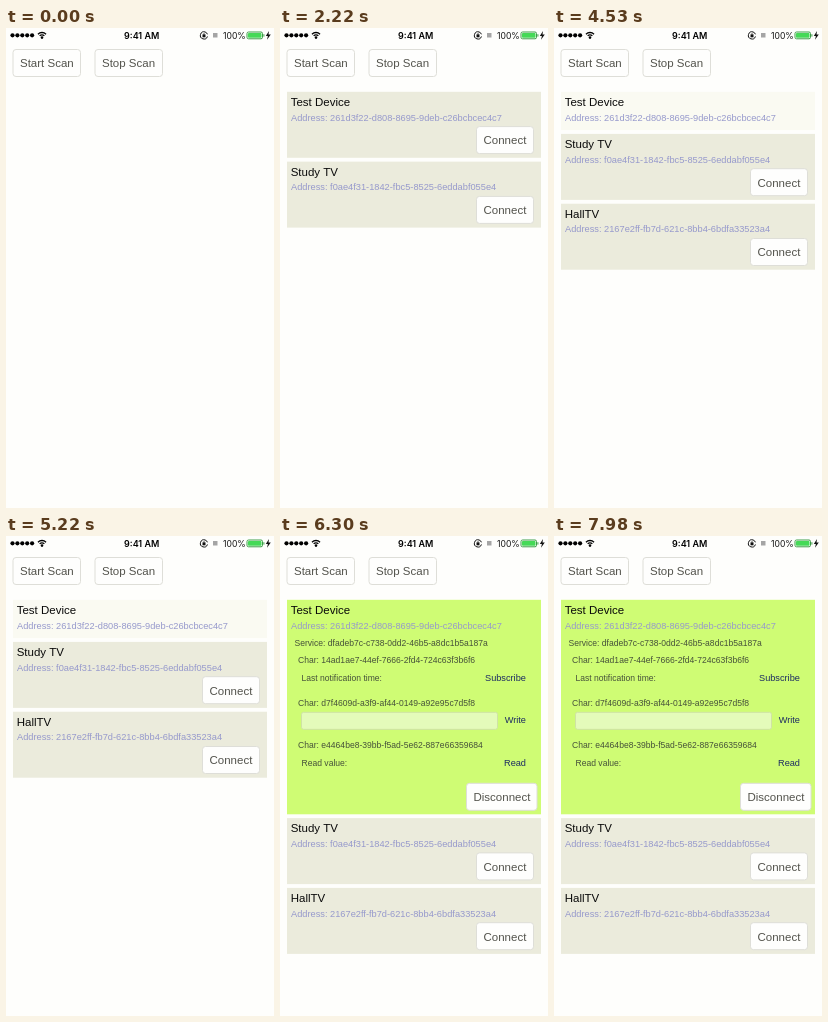
Write an HTML page with a canvas that moves like this. It is 268 by 480 pixels and loops after 8000 ms.

```html
<!DOCTYPE html>
<html lang="en">
<head>
<meta charset="utf-8">
<title>Device scan</title>
<style>
  html, body { margin: 0; width: 100%; height: 100%; overflow: hidden; background: #fefefc; }
  canvas { display: block; width: 268px; height: 480px; }
</style>
</head>
<body>
<canvas id="stage"></canvas>
<script>
const W = 268, H = 480, LOOP = 8000;
const SANS = '"Liberation Sans", Arial, sans-serif';
const UI = 'Inter, sans-serif';

// Moments at which the list changes, in ms
const T = {
  first: 1500, second: 1680, third: 2820,
  press: 3660, pending: 3870, linked: 5310, details: 6240
};

const C = {
  page: '#fefefc', idle: '#ebebdc', pending: '#fafaf2', linked: '#cffc74',
  title: '#0a0a0a', address: '#9699cc', button: '#53534c',
  detail: '#46523a', action: '#1c2b62', border: '#dedeD8'
};

const canvas = document.getElementById('stage');
const ctx = canvas.getContext('2d');
const ratio = window.devicePixelRatio || 1;
canvas.width = W * ratio;
canvas.height = H * ratio;

function text(str, x, y, size, color, font = SANS, weight = 400) {
  ctx.font = `${weight} ${size}px ${font}`;
  ctx.fillStyle = color;
  ctx.fillText(str, x, y);
}

function rect(x, y, w, h, color) {
  ctx.fillStyle = color;
  ctx.fillRect(x, y, w, h);
}

function box(x, y, w, h, r, fill, stroke) {
  ctx.beginPath();
  ctx.roundRect(x, y, w, h, r);
  if (fill) { ctx.fillStyle = fill; ctx.fill(); }
  if (stroke) { ctx.strokeStyle = stroke; ctx.lineWidth = 1; ctx.stroke(); }
}

function dot(x, y, r, color) {
  ctx.beginPath();
  ctx.arc(x, y, r, 0, Math.PI * 2);
  ctx.fillStyle = color;
  ctx.fill();
}

function button(label, x, y, w, fill = '#fefefd') {
  box(x, y, w, 27, 3, fill, C.border);
  text(label, x + 7, y + 17.8, 11.5, C.button);
}

function wifi(x, y) {
  ctx.strokeStyle = '#000';
  ctx.lineWidth = 1.3;
  for (const r of [3.3, 5.7]) {
    ctx.beginPath();
    ctx.arc(x, y, r, -Math.PI * 0.75, -Math.PI * 0.25);
    ctx.stroke();
  }
  dot(x, y - 0.6, 1.3, '#000');
}

function statusBar() {
  for (let i = 0; i < 5; i++) dot(6.5 + i * 4.9, 7.3, 2.1, '#000');
  wifi(36, 10.2);
  text('9:41 AM', 118, 10.7, 9, '#000', UI, 600);

  // Rotation lock
  ctx.strokeStyle = '#111';
  ctx.lineWidth = 1;
  ctx.beginPath();
  ctx.arc(198, 7.4, 3.6, 0.3, Math.PI * 1.9);
  ctx.stroke();
  rect(196.5, 6.9, 3, 2.4, '#111');
  ctx.beginPath();
  ctx.arc(198, 6.9, 1, Math.PI, 0);
  ctx.stroke();

  rect(207, 5, 4.5, 4.5, '#a5a5a5');
  text('100%', 217, 10.7, 8.6, '#111', UI);

  // Battery and charging bolt
  box(241, 4, 15.5, 6.8, 1.5, null, '#3c9d46');
  box(242, 5, 13.5, 4.8, 0.7, '#45d957');
  rect(257.4, 6.2, 1, 2.4, '#3c9d46');
  ctx.beginPath();
  [[263, 3], [259.8, 8], [261.9, 8], [261, 11.8], [264.8, 6.5], [262.5, 6.5]]
    .forEach(([x, y]) => ctx.lineTo(x, y));
  ctx.fillStyle = '#111';
  ctx.fill();
}

function details(y) {
  const line = (str, x, dy) => text(str, x, y + dy, 8.57, C.detail);
  const action = (str, x, dy) => text(str, x, y + dy, 9.2, C.action);
  line('Char: 14ad1ae7-44ef-7666-2fd4-724c63f3b6f6', 18, 63.5);
  line('Last notification time:', 21.5, 81);
  action('Subscribe', 205, 81.5);
  line('Char: d7f4609d-a3f9-af44-0149-a92e95c7d5f8', 18, 106);
  box(21.5, y + 112.5, 196, 17, 2, '#e4fbba', '#cfe3a4');
  action('Write', 224.7, 123.5);
  line('Char: e4464be8-39bb-f5ad-5e62-887e66359684', 18, 148.5);
  line('Read value:', 21.5, 166);
  action('Read', 224, 166.5);
}

const heights = { idle: 66, pending: 38.3, linked: 87, details: 214.5 };

// Draws one device and returns the top of the next
function card(y, name, address, state, pressed) {
  const h = heights[state];
  const open = state === 'linked' || state === 'details';
  rect(7, y, 254, h, open ? C.linked : C[state]);
  text(name, 10.7, y + 14, 11.5, C.title);
  text('Address: ' + address, 11, y + 28.7, 9.26, C.address);
  if (open) {
    text('Service: dfadeb7c-c738-0dd2-46b5-a8dc1b5a187a', 14.5, y + 46, 8.57, C.detail);
    if (state === 'details') details(y);
    button('Disconnect', 186.5, y + h - 31, 70.5);
  } else if (state === 'idle') {
    button('Connect', 196.5, y + 34.8, 57, pressed ? '#bcbcb4' : undefined);
  }
  return y + h + 3.8;
}

function stateAt(t) {
  if (t >= T.details) return 'details';
  if (t >= T.linked) return 'linked';
  return t >= T.pending ? 'pending' : 'idle';
}

function draw(t) {
  ctx.setTransform(ratio, 0, 0, ratio, 0, 0);
  rect(0, 0, W, H, C.page);
  statusBar();
  button('Start Scan', 7, 21.5, 67.5);
  button('Stop Scan', 89, 21.5, 67.5);

  let y = 63.8;
  if (t >= T.first) {
    y = card(y, 'Test Device', '261d3f22-d808-8695-9deb-c26bcbcec4c7',
      stateAt(t), t >= T.press);
  }
  if (t >= T.second) y = card(y, 'Study TV', 'f0ae4f31-1842-fbc5-8525-6eddabf055e4', 'idle');
  if (t >= T.third) card(y, 'HallTV', '2167e2ff-fb7d-621c-8bb4-6bdfa33523a4', 'idle');
}

const start = performance.now();
function tick() {
  draw((performance.now() - start) % LOOP);
  requestAnimationFrame(tick);
}
tick();
</script>
</body>
</html>
```
